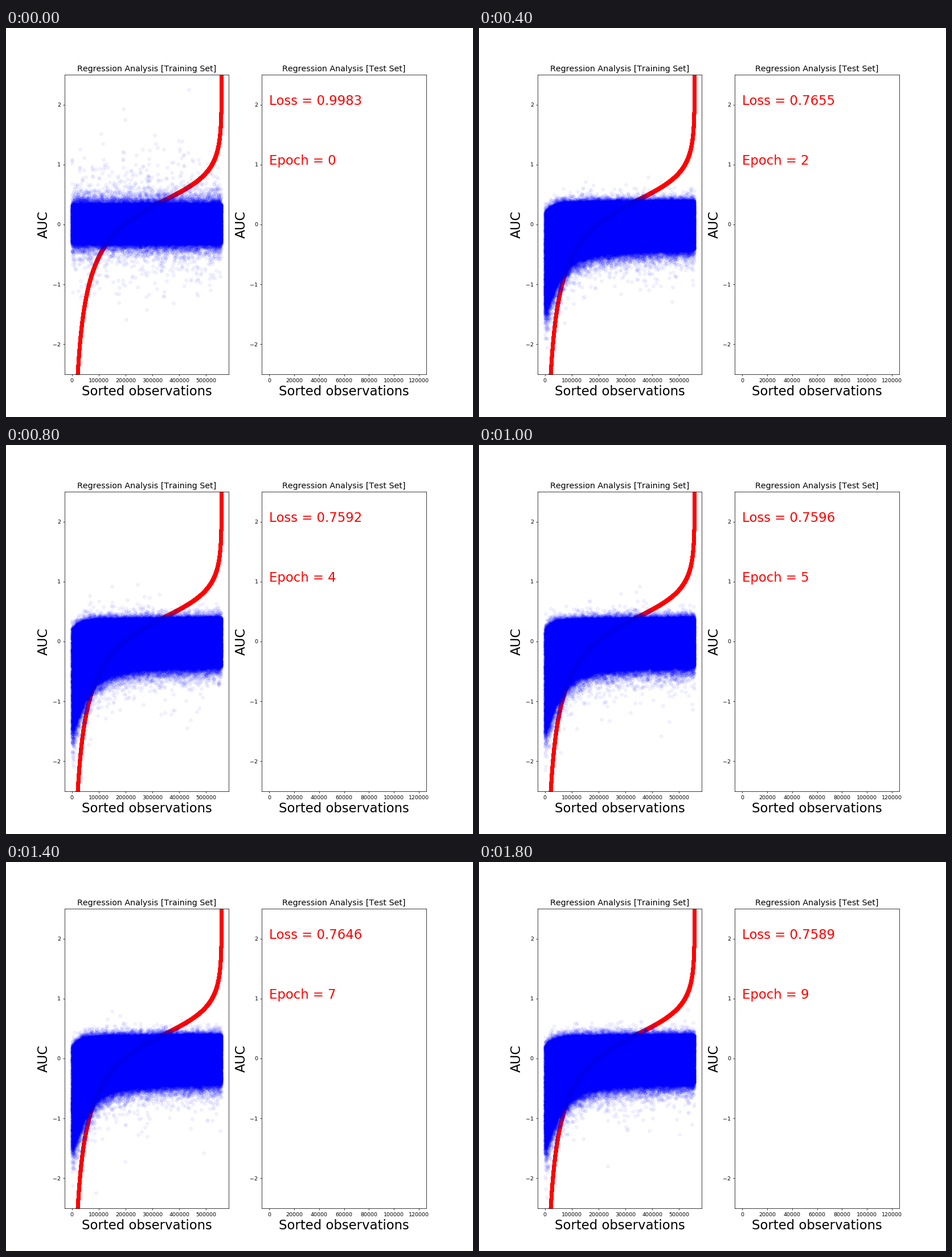
These frames come from a looping animation (820x683 px, 2 s). A matplotlib script:

```python
import numpy as np
import matplotlib.pyplot as plt
from matplotlib.animation import FuncAnimation

W, H, DPI = 820, 683, 820 / 12
N_TRAIN, N_TEST = 557500, 120000
N_CORE = 130000

# Loss shown at each epoch
LOSSES = [0.9983, 0.8284, 0.7655, 0.7612, 0.7592,
          0.7596, 0.7591, 0.7646, 0.7602, 0.7589]


def target_value(t):
    """Sorted target: heavy lower tail, logarithmic upper tail."""
    low = np.log(t)
    return (0.275 + low * (0.177 - 0.173 * low + 0.0098 * low**2)
            - 0.27 * np.log(1 - t))


def top_edge(t, epoch):
    if epoch == 0:
        return np.full_like(t, 0.33)
    return 0.36 + 0.03 * t - 0.17 * np.exp(-t / 0.05)


def bottom_edge(t, epoch):
    if epoch == 0:
        return np.full_like(t, -0.31)
    depth = 0.72 - 0.3 * 0.4**epoch
    return -(0.41 + 0.36 * np.exp(-t / 0.22)
             + depth * np.exp(-(t / 0.1)**1.3))


def predictions(epoch):
    """Dense band, soft haze on both edges and a few far outliers."""
    rng = np.random.default_rng(epoch + 11)
    t = rng.random(N_CORE)
    lo, hi = bottom_edge(t, epoch), top_edge(t, epoch)
    parts = [(t, lo + (hi - lo) * rng.random(N_CORE))]

    def above(n, scale):
        t = rng.random(n)
        parts.append((t, top_edge(t, epoch) + rng.exponential(scale, n)))

    def below(n, scale, left=0.0, skew=1.0):
        t = rng.random(n)**skew
        spread = scale + left * np.exp(-t / 0.15)
        parts.append((t, bottom_edge(t, epoch) - rng.exponential(spread)))

    if epoch == 0:
        above(2700, 0.062)
        above(500, 0.25)
        below(2700, 0.06)
        below(450, 0.28)
    else:
        above(1800, 0.034)
        above(130, 0.09)
        below(3600, 0.062, left=0.045, skew=1.1)
        below(550, 0.16, skew=1.4)
    t, y = np.hstack(parts)
    return np.column_stack([t * N_TRAIN, y])


def setup(ax, name, n, step):
    ax.set_title(f"Regression Analysis [{name} Set]", fontsize=15)
    ax.set_xlabel("Sorted observations", fontsize=24)
    ax.set_ylabel("AUC", fontsize=24)
    ax.set_xlim(-0.05 * n, 1.05 * n)
    ax.set_ylim(-2.5, 2.5)
    ax.set_xticks(range(0, n + 1, step))
    ax.set_yticks(range(-2, 3))


plt.rcParams["font.family"] = "DejaVu Sans"
plt.rcParams["text.kerning_factor"] = 6
# The small surplus guards against rounding down to one pixel less
fig, (train, test) = plt.subplots(
    1, 2, figsize=((W + 0.01) / DPI, (H + 0.01) / DPI), dpi=DPI)
fig.subplots_adjust(left=0.125, right=0.9, bottom=0.11, top=0.88, wspace=0.2)
setup(train, "Training", N_TRAIN, 100000)
setup(test, "Test", N_TEST, 20000)

# Cosine spacing packs points where the curve is steep
t = (1 - np.cos(np.linspace(0, np.pi, 6002)[1:-1])) / 2
train.scatter(t * N_TRAIN, target_value(t), color="red")
cloud = train.scatter([], [], color="blue", alpha=0.05)
loss_text = test.text(0, 2, "", color="red", fontsize=24)
epoch_text = test.text(0, 1, "", color="red", fontsize=24)


def update(epoch):
    cloud.set_offsets(predictions(epoch))
    loss_text.set_text(f"Loss = {LOSSES[epoch]:.4f}")
    epoch_text.set_text(f"Epoch = {epoch}")
    return cloud, loss_text, epoch_text


# Scatter resets the limits only when autoscaling is on
train.set_autoscale_on(False)
anim = FuncAnimation(fig, update, frames=len(LOSSES), interval=200,
                     repeat=True, repeat_delay=0)
plt.show()
```
